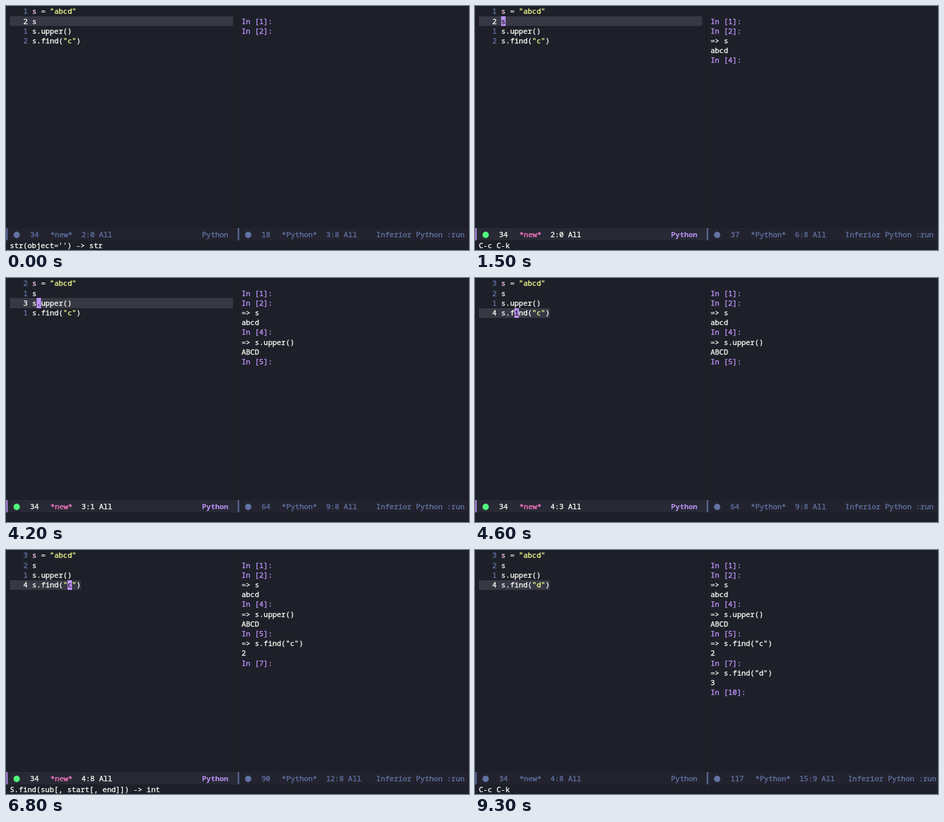
An HTML page with a canvas for the animation above (9.8 s loop, 716 by 379 pixels).

```html
<!DOCTYPE html>
<html lang="en">
<head>
<meta charset="utf-8">
<title>Sending lines to a Python shell</title>
<style>
html, body { margin: 0; width: 100%; height: 100%; overflow: hidden; background: #1e2029; }
canvas { display: block; width: 716px; height: 379px; }
</style>
</head>
<body>
<canvas id="stage" width="716" height="379"></canvas>
<script>
const ctx = document.getElementById('stage').getContext('2d');
const LOOP = 9800;
const SIZE = 11.39, CHAR = SIZE * 0.6, ROW = 15.2;
const EDIT_X = 40.5, SHELL_X = 364.2;
const C = {
  bg: '#1e2029', line: '#373844', bar: '#22232e', barOn: '#272934', split: '#191a21',
  fg: '#f8f8f2', dim: '#6272a4', purple: '#bd93f9', pink: '#ff79c6',
  variable: '#ffc9e8', string: '#f1fa8c', green: '#50fa7b'
};

// Each event is [time, changes]; changes accumulate over the loop.
const events = [
  [0, { focus: false, row: 1, col: 0, sent: 0, arg: 'c', thin: false, echo: "str(object='') -> str" }],
  [500, { focus: true }],
  [1200, { echo: 'C-c-' }],
  [1300, { echo: 'C-c C-k' }],
  [1400, { sent: 1 }],
  [2400, { row: 2, echo: '' }],
  [3000, { echo: 'C-c-' }],
  [3200, { echo: 'C-c C-k' }],
  [3300, { sent: 2 }],
  [4000, { col: 1, echo: '' }],
  [4300, { row: 3 }],
  [4400, { col: 2 }],
  [4600, { col: 3 }],
  [4900, { echo: 'C-c-' }],
  [5200, { echo: 'C-c C-k' }],
  [5300, { sent: 3 }],
  [6000, { col: 6, echo: '' }],
  [6100, { col: 8 }],
  [6800, { echo: 'S.find(sub[, start[, end]]) -> int' }],
  [6900, { thin: true }],
  [7100, { thin: false, arg: 'd', echo: '' }],
  [7500, { echo: 'C-c-' }],
  [7700, { echo: 'C-c C-k' }],
  [7900, { sent: 4 }],
  [9200, { focus: false }]
];

const calls = [
  ['s', 'abcd', 4],
  ['s.upper()', 'ABCD', 5],
  ['s.find("c")', '2', 7],
  ['s.find("d")', '3', 10]
];
const shellSizes = [18, 37, 64, 90, 117];

function stateAt(t) {
  const state = {};
  for (const [start, change] of events) if (start <= t) Object.assign(state, change);
  return state;
}

function rect(x, y, w, h, color) {
  ctx.fillStyle = color;
  ctx.fillRect(x, y, w, h);
}

// Regular text gets a hairline outline for a medium weight.
function text(str, x, y, color, bold) {
  ctx.font = `${bold ? 700 : 400} ${SIZE}px "Noto Sans Mono", "DejaVu Sans Mono", monospace`;
  ctx.fillStyle = ctx.strokeStyle = color;
  ctx.lineWidth = 0.35;
  ctx.lineJoin = 'round';
  ctx.fillText(str, x, y);
  if (!bold) ctx.strokeText(str, x, y);
}

function spans(parts, x, y) {
  for (const [str, color] of parts) {
    text(str, x, y, color);
    x += str.length * CHAR;
  }
}

function dot(x, color) {
  ctx.fillStyle = color;
  ctx.beginPath();
  ctx.arc(x, 355.5, 4.9, 0, Math.PI * 2);
  ctx.fill();
}

const rowTop = r => Math.round(1 + r * ROW);
const baseline = r => 12.4 + r * ROW;

function drawEditor(s) {
  const lines = [
    [['s', C.variable], [' = ', C.fg], ['"abcd"', C.string]],
    [['s', C.fg]],
    [['s.upper()', C.fg]],
    [['s.find(', C.fg], [`"${s.arg}"`, C.string], [')', C.fg]]
  ];
  const top = rowTop(s.row), height = rowTop(s.row + 1) - top;
  const right = s.row === 3 ? EDIT_X + 11 * CHAR : 351;
  rect(6, top, right - 6, height, C.line);

  lines.forEach((parts, r) => {
    const here = r === s.row;
    const number = here ? r + 1 : Math.abs(r - s.row);
    text(String(number), 26.8, baseline(r), here ? C.fg : C.dim);
    spans(parts, EDIT_X, baseline(r));
  });

  if (!s.focus) return;
  const x = EDIT_X + s.col * CHAR;
  if (s.thin) {
    rect(x, top + height - 2, CHAR, 2, C.purple);
    return;
  }
  rect(x, top, CHAR, height, C.purple);
  const under = lines[s.row].map(p => p[0]).join('')[s.col];
  text(under, x, baseline(s.row), C.bg);
}

function drawShell(s) {
  const prompt = (n, r) => text(`In [${n}]:`, SHELL_X, baseline(r), C.purple);
  prompt(1, 1);
  prompt(2, 2);
  calls.slice(0, s.sent).forEach(([code, result, next], i) => {
    const r = 3 + i * 3;
    text('=> ' + code, SHELL_X, baseline(r), C.fg);
    text(result, SHELL_X, baseline(r + 1), C.fg);
    prompt(next, r + 2);
  });
}

function drawBars(s) {
  const y = 359.4, on = s.focus;
  const pick = color => on ? color : C.dim;
  rect(0, 345, 358, 19, on ? C.barOn : C.bar);
  rect(0.5, 345, 2, 19, pick(C.purple));
  dot(16.5, pick(C.green));
  text('34', 37.3, y, pick(C.fg));
  text('*new*', 68.8, y, pick(C.pink));
  text(`${s.row + 1}:${s.col} All`, 68.8 + 7 * CHAR, y, pick(C.fg));
  text('Python', 303, y, pick(C.purple), on);

  const size = String(shellSizes[s.sent]);
  const wide = size.length > 2;
  const name = wide ? 433.4 : 426.6;
  rect(358, 345, 358, 19, C.bar);
  rect(358.5, 345, 2, 19, C.dim);
  dot(374.5, C.dim);
  text(size, 395.2, y, C.dim);
  text('*Python*', name, y, C.dim);
  text(`${3 + s.sent * 3}:${wide ? 9 : 8} All`, name + 10 * CHAR, y, C.dim);
  text('Inferior Python :run', wide ? 577 : 572.6, y, C.dim);
}

function draw(t) {
  const s = stateAt(t);
  rect(0, 0, 716, 379, C.bg);
  rect(357.5, 0, 1, 345, C.split);
  drawEditor(s);
  drawShell(s);
  drawBars(s);
  text(s.echo, 6, 376.2, C.fg);
}

const start = performance.now();
function tick() {
  draw((performance.now() - start) % LOOP);
  requestAnimationFrame(tick);
}
tick();
</script>
</body>
</html>
```
